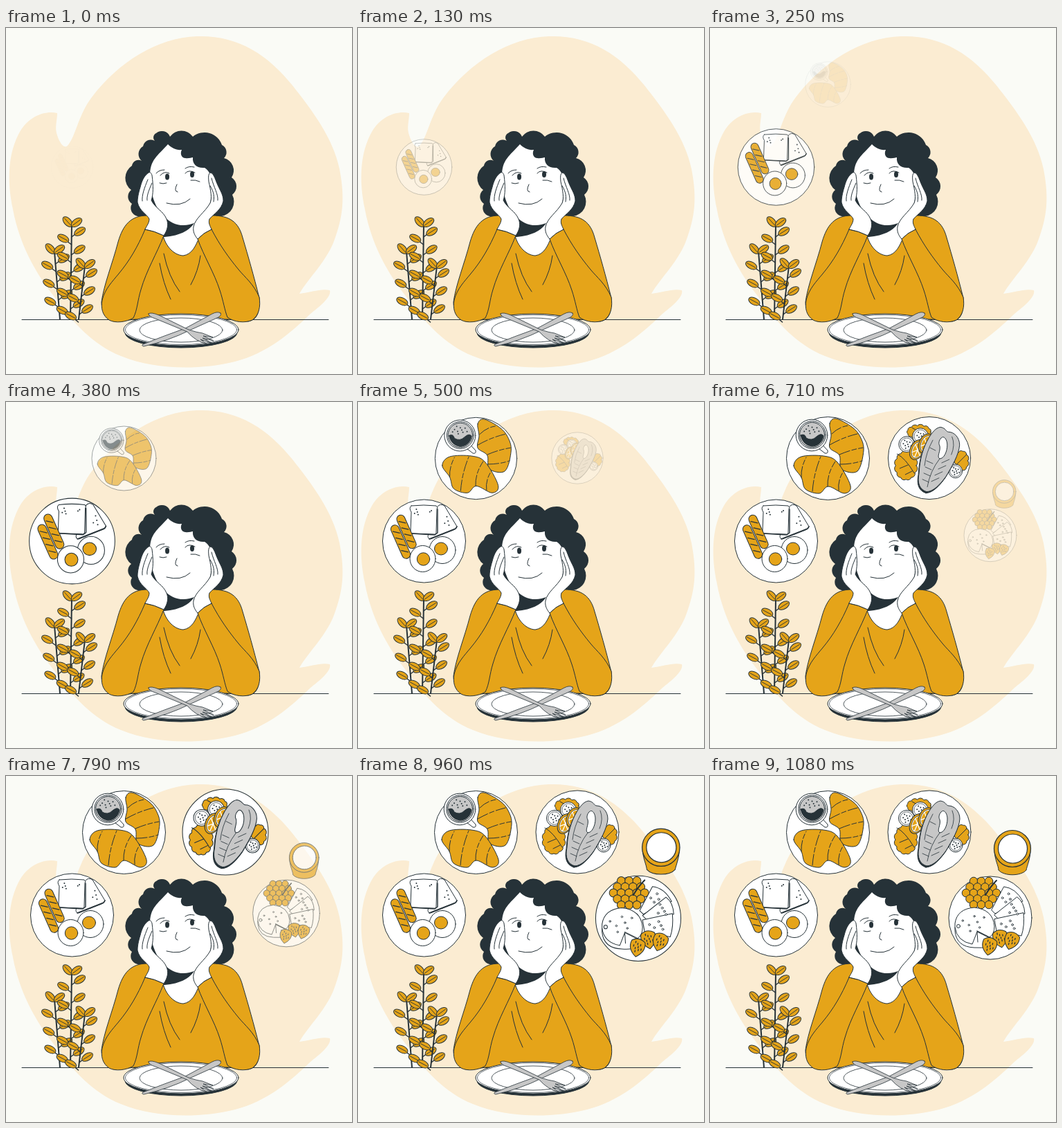
These frames come from a looping animation (500x500 px, 1120 ms). An HTML page:

```html
<!DOCTYPE html>
<html lang="en">
<head>
<meta charset="utf-8">
<title>Dreaming of food</title>
<style>
html, body { margin: 0; width: 100%; height: 100%; overflow: hidden; background: #fafbf6; }
svg { display: block; width: 100vw; height: 100vh; }
</style>
</head>
<body>
<svg id="stage" viewBox="0 0 500 500" stroke-linecap="round" stroke-linejoin="round"></svg>
<script>
const INK = '#263238', GOLD = '#e5a419', CREAM = '#fbecd2', GREY = '#c7c7c7';

const path = (d, fill = 'none', stroke = INK, width = 1) =>
  `<path d="${d}" fill="${fill}" stroke="${stroke}" stroke-width="${width}"/>`;
const ellipse = (x, y, rx, ry, fill = '#fff', turn = 0, stroke = INK, width = 1) =>
  `<ellipse cx="${x}" cy="${y}" rx="${rx}" ry="${ry}" fill="${fill}" stroke="${stroke}" stroke-width="${width}" transform="rotate(${turn} ${x} ${y})"/>`;
const circle = (x, y, r, fill, width) => ellipse(x, y, r, r, fill, 0, INK, width);
const dot = (x, y, r = 1) => ellipse(x, y, r, r, INK, 0, 'none');
const place = (x, y, turn, content) => `<g transform="translate(${x} ${y}) rotate(${turn})">${content}</g>`;
const repeat = (n, draw) => Array.from({ length: n }, (_, i) => draw(i)).join('');
const points = s => s.split(' ').map(p => p.split(',').map(Number));

// Closed smooth curve through the given points.
function smooth(s) {
  const p = points(s), n = p.length, at = i => p[(i + n) % n];
  return `M${p[0]}` + repeat(n, i => {
    const [a, b, c, e] = [at(i - 1), at(i), at(i + 1), at(i + 2)];
    return `C${[0, 1].map(k => b[k] + (c[k] - a[k]) / 6)} ${[0, 1].map(k => c[k] - (e[k] - b[k]) / 6)} ${c}`;
  }) + 'Z';
}

// Chain of round bumps from point to point.
function bumps(p, bulge = .61) {
  return `M${p[0]}` + p.slice(1).map((q, i) => {
    const r = Math.hypot(q[0] - p[i][0], q[1] - p[i][1]) * bulge;
    return `A${r} ${r} 0 0 1 ${q}`;
  }).join('') + 'Z';
}

// Frilled ellipse.
function frill(x, y, rx, ry, n) {
  const rim = Array.from({ length: n + 1 }, (_, i) => {
    const a = i / n * 2 * Math.PI;
    return [x + rx * Math.cos(a), y + ry * Math.sin(a)];
  });
  return path(bumps(rim), GOLD);
}

// Even scatter of n marks inside an ellipse.
const scatter = (n, x, y, rx, ry, draw) => repeat(n, i => {
  const r = Math.sqrt((i + .5) / n), a = i * 2.4;
  return draw(x + rx * r * Math.cos(a), y + ry * r * Math.sin(a));
});

function backdrop() {
  return path('M74 123C74 134 70 144 74 155C78 168 84 173 88 171C100 160 104 126 124 100C162 50 218 14 276 12C334 10 378 38 414 83C444 121 473 160 482 204C490 246 487 272 475 305C464 337 437 361 424 384C440 382 456 376 468 379C471 389 451 404 440 413C412 440 378 470 331 482C278 495 215 494 166 474C124 457 96 424 77 397C50 366 20 318 10 262C1 220 3 180 20 150C34 126 58 119 74 123Z', CREAM, 'none');
}

function plant() {
  const leaf = (x, y, turn) => place(x, y, turn, ellipse(0, 0, 8.8, 5, GOLD) + path('M-7 0H7', 'none', INK, .8));
  const stem = (x0, x1, top, pairs) => {
    const at = y => x1 + (x0 - x1) * (y - top) / (421 - top);
    const twig = (x, y) => path(`M${at(y + 9)} ${y + 9}L${x} ${y}`, 'none', INK, 1.5);
    return path(`M${x0} 421L${x1} ${top}`, 'none', INK, 2) +
      leaf(x1 - 6, top - 4, 48) + leaf(x1 + 7, top - 3, -36) +
      repeat(pairs, i => {
        const y = top + 20 + i * 26, left = at(y) - 12, right = at(y) + 12;
        return twig(left, y) + twig(right, y - 11) + leaf(left, y, 28) + leaf(right, y - 10, -32);
      });
  };
  return stem(78, 70, 323, 3) + stem(93, 95, 284, 5) + stem(105, 114, 344, 3);
}

function woman() {
  const hair = bumps(points('190,272 182,254 181,234 182,199 196,192 198,171 215,163 217,152 237,157 270,157 312,169 315,188 326,216 327,241 311,272'));
  const body = 'M204 271C180 271 169 285 162 309C154 340 141 372 138 396C138 411 149 424 158 424L187 421H320L350 424C365 421 366 409 366 390C358 358 350 330 342 303C336 280 323 271 298 271Z';
  const leftSleeve = 'M201 291Q214 293 228 300C218 326 203 350 195 378C190 394 190 407 184 419C174 425 158 427 149 422C139 415 137 405 139 393C143 377 154 366 163 355C178 337 190 317 201 291Z';
  const rightSleeve = 'M297 291Q285 296 277 305C286 330 301 354 309 379C314 394 316 408 320 418C329 425 345 427 356 422C366 415 368 402 366 389C358 370 345 360 336 349C322 332 309 314 297 291Z';
  const face = 'M208 214C208 190 219 185 234 168C239 173 246 177 254 176C251 182 254 188 259 188C264 189 268 187 270 187C269 197 276 203 287 202C292 205 296 210 296 220C300 250 293 268 274 281C257 289 240 285 228 272C213 258 208 232 208 214Z';
  const leftHand = 'M206 209C199 214 196 222 194 230C191 240 190 246 190 252C193 265 204 269 207 276C207 282 203 286 201 291Q214 293 228 300C234 291 235 283 232 276C227 264 216 261 210 249C213 240 213 228 211 213C210 209 208 208 206 209Z';
  const rightHand = 'M296 209C301 211 303 221 306 227C310 236 314 241 314 250C311 263 301 268 294 276C292 282 295 286 297 291Q285 296 277 305C272 299 270 294 271 287C274 274 287 267 295 253C298 246 296 235 293 222C292 213 293 209 296 209Z';
  return path(hair, INK, 'none') + path(body, GOLD) +
    path('M23 421.5H466') +
    path('M226 296C229 313 241 328 256 329C269 327 274 315 279 303L272 272H229Z', '#fff') +
    path('M225 302C233 289 229 276 232 274L274 278C268 293 247 302 225 302Z', INK, 'none') +
    path(face, '#fff', 'none') +
    path(leftSleeve, GOLD) + path(rightSleeve, GOLD) +
    path(leftHand, '#fff') + path(rightHand, '#fff') +
    path('M205 219C200 231 196 242 197 250M211 224C206 235 203 244 204 249M297 217C300 230 307 240 306 249M295 228C301 238 301 244 300 251') +
    path('M222 340Q227 369 238 392M228 326Q235 360 251 381M281 329Q278 351 267 371') +
    path('M217 210Q221 205 229 205M259 203Q264 199 272 201M223 213Q229 206 236 210M259 210Q264 204 273 209M222 224Q227 226 232 224M267 220Q274 219 280 222M247 226Q242 236 248 237M232 253Q253 259 266 247') +
    ellipse(233, 215, 3, 4.5, INK, 0, 'none') + ellipse(269, 211.5, 3, 4.5, INK, 0, 'none');
}

function dinnerPlate() {
  return ellipse(253, 440, 81, 22, INK) + ellipse(253, 436, 83, 23) +
    ellipse(253, 436, 80.5, 21.5, '#fff', 0, INK, .7) + ellipse(253, 436.5, 60, 17.5, '#fff', 0, INK, .8) +
    path('M310 412Q312 415 307 418L265 437Q235 452 199 460Q195 459 198 457Q228 445 259 434L298 413Q306 409 310 412Z', GREY, INK, .8) +
    path('M206 413Q209 410 221 415L264 436Q276 440 284 441L299 447L285 445L300 452L284 448L299 456L281 450L291 457Q274 453 262 439L216 420Q206 417 206 413Z', GREY, INK, .8);
}

function breakfast() {
  const sausage = (x, y) => place(x, y, -24,
    `<rect x="-6" y="-26" width="12" height="52" rx="6" fill="${GOLD}" stroke="${INK}"/>` +
    repeat(4, i => path(`M-4 ${i * 10 - 18}l8 6`, 'none', INK, 1.2)));
  return circle(95.5, 201, 60) +
    path('M115 151Q119 146 125 150L143 180Q142 184 138 185L105 198Q101 198 101 194Z', '#fff') +
    path('M103 198L141 183L143 180', 'none', INK, 1.6) +
    path('M77 150Q95 148 113 150Q116 152 114 155L113 188Q113 192 109 191L79 190Q75 190 76 186L77 159Q73 153 77 150Z', '#fff') +
    path('M77 190L111 192L115 189V155', 'none', INK, 1.4) +
    scatter(4, 84, 159, 5, 5, dot) + scatter(2, 105, 157, 2, 3, dot) + scatter(4, 128, 172, 6, 8, dot) +
    sausage(70, 187.5) + sausage(61.5, 202) +
    ellipse(122, 214, 19, 19.5) + ellipse(120, 212, 9.5, 9, GOLD) +
    ellipse(93.5, 226.5, 18.5, 19) + circle(94.5, 227, 9.2, GOLD);
}

function coffee() {
  return circle(170.5, 81.5, 60) +
    path(smooth('173,31 182,24 205,36 217,50 222,70 213,100 190,97 187,77 173,66 175,48'), GOLD) +
    path(smooth('121,92 132,79 164,78 184,87 203,121 194,132 171,122 158,132 138,126 132,109'), GOLD) +
    `<g stroke-dasharray="16 3 7 3">` +
    path('M176 46Q186 36 200 34M173 62Q192 51 213 46M187 76Q203 69 221 66M188 90Q205 90 220 85') +
    path('M132 109Q131 95 139 80M148 129Q150 103 160 79M170 122Q169 104 181 86M186 128Q184 114 193 100') + '</g>' +
    path('M158 57L170 70Q171 75 166 74L153 64Z', '#fff') +
    circle(147, 48, 22.8) + circle(147.5, 47.5, 19.8) + circle(147.5, 47.5, 18, GREY) +
    path('M131 48Q137 45 139 52Q147 57 154 50Q161 44 164 49C162 60 154 64 147 64Q134 62 131 48Z', INK) +
    scatter(10, 147, 40, 12, 7, dot);
}

function fishDish() {
  const cucumber = (x, y, r) => circle(x, y, r) + circle(x, y, r * .8, '#fff', .7) +
    scatter(9, x, y, r * .6, r * .6, dot);
  const citrus = (x, y) => place(x, y, 24, ellipse(0, 0, 10, 15, GOLD) + ellipse(.8, 0, 8, 12.5, '#fff', 0, INK, .7) +
    ellipse(1, 0, 6.8, 11, GOLD, 0, 'none') +
    path('M1 -11V11M-5 -6L7 6M7 -6L-5 6', 'none', '#fff', 1.3));
  const steak = 'M313 130C303 127 299 118 302 103C303 82 308 66 316 52C321 44 326 37 333 36C341 37 341 43 345 43C353 43 361 51 361 62C360 76 350 93 341 108C333 119 323 130 313 130Z';
  return circle(317, 81, 60) +
    frill(302, 43, 17, 9, 11) + frill(283, 92, 15, 20, 12) + frill(364, 85, 9, 14, 9) +
    path('M270 75Q282 81 295 103M274 96L286 91M282 105L292 100M292 37L304 44M357 90L371 76') +
    cucumber(284, 61, 11.5) + cucumber(304, 49, 11.5) + cucumber(355, 100, 10) +
    citrus(299, 69) + citrus(312, 60) +
    place(-1, 2, 0, path(steak, INK)) + path(steak, GREY) +
    path('M334 52C338 47 343 54 343 62C343 72 338 82 332 82C327 79 334 71 332 63C330 60 331 55 334 52Z', '#fff') +
    path('M332 82Q318 100 314 123M322 55Q312 73 310 92M350 50Q355 62 349 76M318 66L326 70', 'none', INK, .8) +
    repeat(4, i => path(`M${307 + i * 2} ${112 - i * 9}l9 4M${331 + i * 5} ${110 - i * 9}l-11 5`, 'none', INK, .8));
}

function cheeseDish() {
  const hole = r => (x, y) => circle(x, y, r, '#fff', .9);
  const grapes = repeat(25, i => {
    const row = Math.floor(i / 5), x = 370 + (i % 5) * 11 + (row % 2) * 5.5, y = 152 + row * 8.5;
    return Math.hypot((x - 394) / 27, (y - 169) / 22) < 1 ? circle(x, y, 5.8, GOLD) : '';
  });
  const berry = (x, y, turn) => place(x, y, turn, path('M-9 -9Q0 -16 10 -9Q14 3 1 13Q-13 4 -9 -9Z', GOLD) +
    scatter(9, 0, -2, 7, 8, (a, b) => path(`M${a} ${b}v2`, 'none', INK, 1.3)));
  return circle(405, 205, 60) + grapes + path('M398 172Q405 160 414 151', 'none', INK, 2) +
    path('M425 160Q442 162 452 181L412 199L407 194Z', '#fff') +
    path('M444 175Q454 182 455 199L418 208L411 201Z', '#fff') +
    path('M453 198Q455 216 450 231L414 224L411 207Z', '#fff') +
    scatter(5, 431, 178, 9, 11, hole(1.4)) + scatter(4, 438, 195, 11, 6, hole(1.4)) + scatter(5, 433, 215, 13, 8, hole(1.4)) +
    path('M386 224L414 238Q405 250 382 248Q356 247 354 224V213Q357 192 382 190Q409 193 411 217Q411 229 404 233Z', '#fff') +
    path('M354 219Q357 239 379 243L386 225L408 236M386 225L387 240') +
    scatter(7, 381, 211, 20, 14, hole(1.2)) + circle(359, 217, 2.5) +
    berry(419, 235, -8) + berry(403, 246, 12) + berry(435, 238, 20) +
    path('M411 107C411 120 417 130 417 136C425 145 449 145 457 136C458 130 463 120 463 107Z', GOLD) +
    circle(437, 105, 26.5, GOLD, 1.2) + circle(437.5, 105, 21, '#fff', 1.2);
}

// Each dish zooms in around its own centre, one after another.
const FIRST_MS = -33, STAGGER_MS = 201, POP_MS = 510;
const dishes = [
  { draw: breakfast, x: 95.5, y: 201 },
  { draw: coffee, x: 170.5, y: 81.5 },
  { draw: fishDish, x: 317, y: 81 },
  { draw: cheeseDish, x: 405, y: 171.5 },
];

const stage = document.getElementById('stage');
stage.innerHTML = backdrop() + woman() + plant() + dinnerPlate() +
  dishes.map(d => `<g class="dish">${d.draw()}</g>`).join('');
const groups = stage.querySelectorAll('.dish');

// cubic-bezier(.36, -.01, .5, 1.38)
function overshoot(x) {
  if (x <= 0) return 0;
  if (x >= 1) return 1;
  const curve = (s, a, b) => 3 * (1 - s) * s * ((1 - s) * a + s * b) + s ** 3;
  let low = 0, high = 1;
  for (let i = 0; i < 24; i++) {
    const mid = (low + high) / 2;
    if (curve(mid, .36, .5) < x) low = mid; else high = mid;
  }
  return curve(low, -.01, 1.38);
}

const LOOP_MS = 1120, FPS = 24;

function render(ms) {
  const time = Math.floor((ms % LOOP_MS) * FPS / 1000 + .1) * 1000 / FPS;
  dishes.forEach(({ x, y }, i) => {
    const p = overshoot((time - FIRST_MS - i * STAGGER_MS) / POP_MS), scale = .5 + p / 2;
    groups[i].setAttribute('transform', `translate(${x} ${y}) scale(${scale}) translate(${-x} ${-y})`);
    groups[i].setAttribute('opacity', Math.min(1, Math.max(0, p)));
  });
}

const began = performance.now();
function tick() {
  render(performance.now() - began);
  requestAnimationFrame(tick);
}
tick();
</script>
</body>
</html>
```
